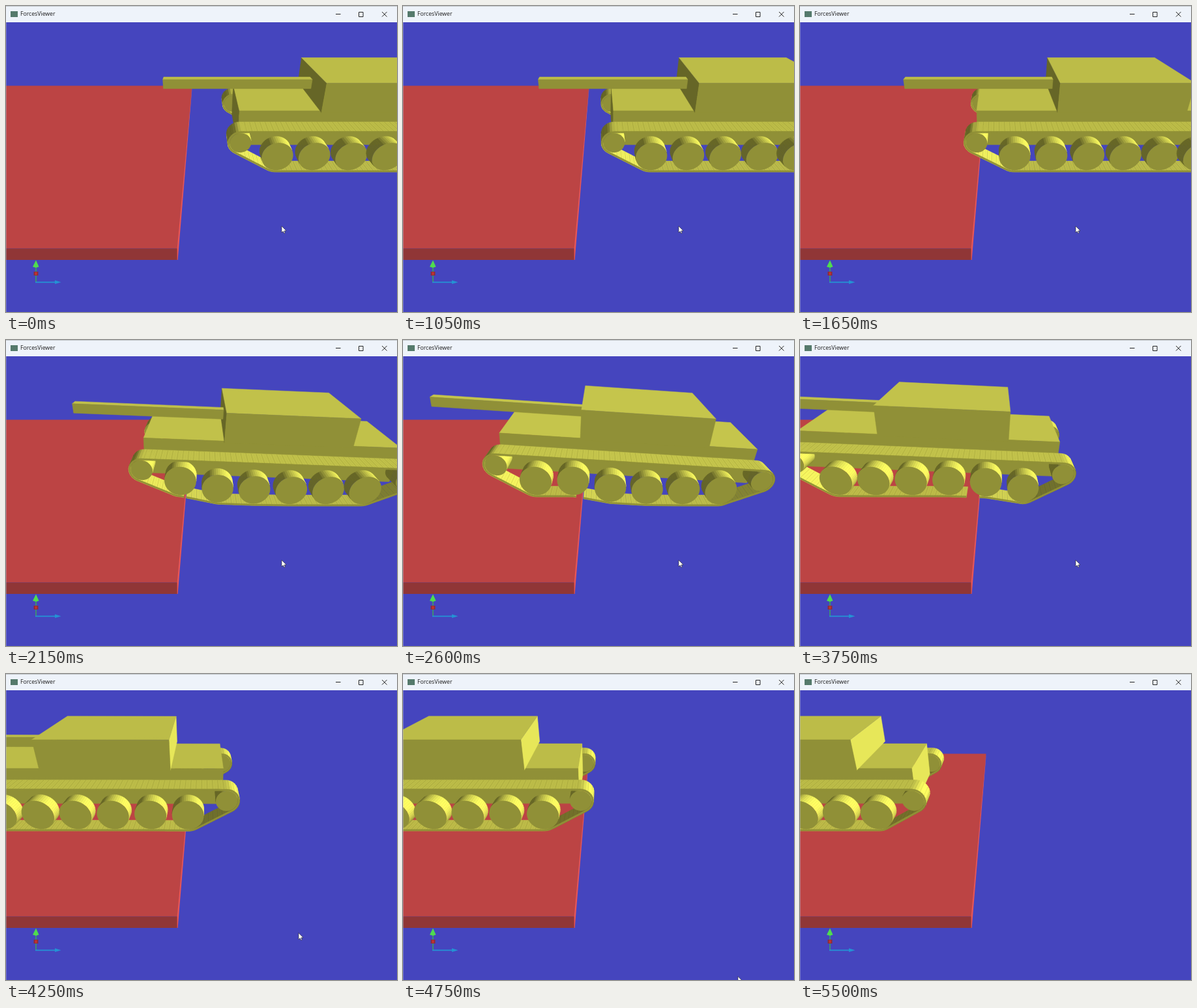
Recreate the animation shown at these times as an HTML page with a canvas. Size 600 by 470 pixels, loop 5550 ms.

```html
<!DOCTYPE html>
<html lang="en">
<head>
<meta charset="utf-8">
<title>ForcesViewer</title>
<style>
html, body { margin: 0; width: 100%; height: 100%; overflow: hidden; background: #4545be; }
#stage { position: absolute; left: 0; top: 0; width: 600px; height: 470px; overflow: hidden; }
canvas { position: absolute; left: 0; top: 0; }
#bar { position: absolute; left: 0; top: 0; width: 600px; height: 25px; background: #eef3fa; border-top: 1px solid #c3c7cc; box-sizing: border-box; }
#bar span { position: absolute; left: 22px; top: 5px; font: 8.7px/13px "Open Sans", "Noto Sans", sans-serif; color: #1c1c1c; white-space: nowrap; }
#bar i { position: absolute; left: 7px; top: 7px; width: 11px; height: 9px; background: #557a6c; }
#bar svg { position: absolute; left: 500px; top: -1px; }
</style>
</head>
<body>
<div id="stage">
  <canvas id="view" width="600" height="470"></canvas>
  <div id="bar">
    <i></i><span>ForcesViewer</span>
    <svg width="100" height="24" fill="none" stroke="#222">
      <path d="M6 12.500h7.500M41.500 9.500h6.500v7h-6.500zM77 9l7.500 7.500M84.500 9l-7.500 7.500"/>
    </svg>
  </div>
</div>
<script>
const ctx = document.getElementById('view').getContext('2d');
const LOOP = 5550, STEP = 50;

// Camera
const TILT = 30.7 * Math.PI / 180, SIN = Math.sin(TILT), COS = Math.cos(TILT);
const FOCAL = 538, EYE_Y = 269;

// World: y = 0 is the platform top, x = 0 is straight ahead of the camera.
const EDGE = -28, LOW = -16.4;
const START = 252.5, ACCEL = 63.2, RAMP = 2.43, CRUISE = 126;

// Tank
const WIDTH = 198, TRACK_W = 34.5, HALF = 197.5, GAP = 56.1;
const WHEEL_R = 23.8, RIM = 27, IDLER_R = 19, IDLER_Y = 50.5, DROOP = 3;
const LINKS = 116;
const YELLOW = [1, 1, 0.385];

const clamp = (v, a, b) => Math.min(b, Math.max(a, v));

function project([x, y], z) {
  const w = FOCAL / (FOCAL - SIN * y + COS * z);
  return [303 + x * w, 247 - (6 + COS * y + SIN * z) * w];
}
function shade(nx, ny, nz = 0) {
  const k = 102 + 161 * Math.max(0, nx * 0.802 + ny * 0.535 + nz * 0.26);
  return `rgb(${YELLOW.map(c => Math.round(Math.min(255, k) * c))})`;
}
const facing = (nx, ny, [x, y]) => -nx * x + ny * (EYE_Y - y) > 0;

function poly(points, color, seal) {
  ctx.beginPath();
  points.forEach(p => ctx.lineTo(p[0], p[1]));
  ctx.closePath();
  ctx.fillStyle = color;
  ctx.fill();
  if (seal) {
    ctx.strokeStyle = color;
    ctx.lineWidth = 0.5;
    ctx.stroke();
  }
}
const strip = (a, b, z0, z1, color) =>
  poly([project(a, z0), project(b, z0), project(b, z1), project(a, z1)], color, true);

function line(points, color, width) {
  ctx.beginPath();
  points.forEach(p => ctx.lineTo(p[0], p[1]));
  ctx.strokeStyle = color;
  ctx.lineWidth = width;
  ctx.stroke();
}

function arc([x, y], r, from, to, n) {
  return Array.from({ length: n + 1 }, (_, i) => {
    const a = (from + (to - from) * i / n) * Math.PI / 180;
    return [x + r * Math.cos(a), y + r * Math.sin(a)];
  });
}

function cylinder(c, r, z0, z1) {
  const n = 48, ring = arc(c, r, 0, 360, n);
  for (let i = 0; i < n; i++) {
    const a = (i + 0.5) * 2 * Math.PI / n, nx = Math.cos(a), ny = Math.sin(a);
    if (facing(nx, ny, ring[i])) strip(ring[i], ring[i + 1], z0, z1, shade(nx, ny));
  }
  poly(ring.map(p => project(p, z0)), shade(0, 0, 1));
}

// Height of a wheel rolling from the low floor over the platform's corner.
function ground(x) {
  const d = clamp(x - EDGE, 0, RIM);
  return Math.max(LOW, Math.sqrt(RIM * RIM - d * d) - RIM);
}

// Uniform acceleration, then constant speed.
function drive(t) {
  const u = Math.min(t, RAMP);
  return START - ACCEL * u * u / 2 - CRUISE * (t - u);
}

const slots = [-2.5, -1.5, -0.5, 0.5, 1.5, 2.5].map(k => k * GAP);

// Equal springs: the hull settles on the best-fit line through its wheels.
function settle(x) {
  let lift = 0, slope = 0, spread = 0;
  slots.forEach(u => {
    const h = ground(x + u);
    lift += h / slots.length;
    slope -= u * h;
    spread += u * u;
  });
  const pitch = Math.atan(slope / spread), s = Math.sin(pitch), c = Math.cos(pitch);
  const turn = (u, v) => [u * c + v * s, v * c - u * s];
  const at = (u, v) => {
    const [dx, dy] = turn(u, v - 50);
    return [x + dx, 50 + dy + lift];
  };
  return { at, turn };
}

function box({ at, turn }, x0, x1, y0, y1, z0, z1) {
  const bl = at(x0, y0), br = at(x1, y0), tr = at(x1, y1), tl = at(x0, y1);
  [[bl, tl, -1, 0], [br, tr, 1, 0], [tl, tr, 0, 1]].forEach(([a, b, nx, ny]) => {
    const n = turn(nx, ny);
    if (facing(...n, a)) strip(a, b, z0, z1, shade(...n));
  });
  poly([bl, br, tr, tl].map(p => project(p, z0)), shade(0, 0, 1), true);
}

// Pieces of the belt, evenly spaced, two to a link.
function makeBelt([front, rear], wheels, travel) {
  const path = [
    ...arc(front, IDLER_R, 90, 238, 12),
    ...arc(wheels[0], RIM, 238, 270, 4),
    ...wheels.slice(1, 5).map(([x, y]) => [x, y - RIM]),
    ...arc(wheels[5], RIM, 270, 302, 4),
    ...arc(rear, IDLER_R, 302, 450, 12)
  ];
  path.push(path[0]);
  const dist = (a, b) => Math.hypot(b[0] - a[0], b[1] - a[1]);
  const len = path.slice(1).map((p, i) => dist(path[i], p));
  const count = 2 * LINKS, gap = len.reduce((a, b) => a + b) / count, phase = travel % (2 * gap);
  const points = [];
  let seg = 0, done = 0;
  for (let i = 0; i < count; i++) {
    const s = i * gap + phase;
    while (seg < len.length - 1 && done + len[seg] < s) done += len[seg++];
    const a = path[seg], b = path[seg + 1], u = Math.min(1, (s - done) / len[seg]);
    points.push([a[0] + (b[0] - a[0]) * u, a[1] + (b[1] - a[1]) * u]);
  }
  return points.map((a, i) => {
    const b = points[(i + 1) % count], d = dist(a, b) || 1;
    const nx = (b[1] - a[1]) / d, ny = (a[0] - b[0]) / d;
    const buried = (a[0] + b[0]) / 2 < EDGE && (a[1] + b[1]) / 2 < -1;
    return { a, b, nx, ny, tick: i % 2 === 0, outer: facing(nx, ny, a), buried };
  }).filter(p => !p.buried);
}

function track(belt, idlers, wheels, z) {
  const surface = outer => belt.filter(p => p.outer === outer).forEach(({ a, b, nx, ny, tick }) => {
    const k = outer ? 1 : -1;
    strip(a, b, z, z + TRACK_W, shade(nx * k, ny * k));
    if (tick) line([project(a, z), project(a, z + TRACK_W)], 'rgba(70,70,10,.16)', 0.7);
  });
  surface(false);
  idlers.forEach(c => cylinder(c, 16, z, z + TRACK_W));
  wheels.forEach(c => cylinder(c, WHEEL_R, z, z + 22));
  surface(true);
  belt.forEach(({ a, b, nx, ny }) => {
    const inset = p => [p[0] - nx * 2.6, p[1] - ny * 2.6];
    poly([a, b, inset(b), inset(a)].map(p => project(p, z)), shade(0, 0, 1), true);
  });
}

function tank(t) {
  const x = drive(t), body = settle(x);
  const idlers = [-HALF, HALF].map(u => body.at(u, IDLER_Y));
  const wheels = slots.map(u => {
    const [wx, wy] = body.at(u, RIM);
    return [wx, Math.max(RIM + ground(wx), wy - DROOP)];
  });
  const belt = makeBelt(idlers, wheels, START - x);
  const gun = () => box(body, -318, -77, 103.4, 118.5, 92, 106);
  const turret = () => box(body, -77, 115, 89, 133.6, 24, WIDTH - 24);
  const turretFrontSeen = body.at(-77, 110)[0] > 0;

  track(belt, idlers, wheels, WIDTH - TRACK_W);
  box(body, -198, 193, 30, 87.8, TRACK_W, WIDTH - TRACK_W);
  (turretFrontSeen ? [turret, gun] : [gun, turret]).forEach(draw => draw());
  track(belt, idlers, wheels, 0);
}

function platform() {
  poly([[0, 122.5], [285.5, 122.5], [263, 372.5], [0, 372.5]], '#bc4444');
  poly([[0, 372.5], [263, 372.5], [263, 390], [0, 390]], '#903636');
  poly([[285.5, 122.5], [285.2, 130], [263.6, 390], [262.6, 390], [262.6, 372.5]], '#e85656');
}

function axes() {
  line([[46, 424], [46, 400]], '#3f9f62', 1.6);
  line([[45, 424.3], [77, 424.3]], '#2492d4', 1.8);
  poly([[75, 421.2], [84.5, 424.3], [75, 427]], '#2492d4');
  poly([[41, 400.5], [46, 390.5], [50.5, 400.5], [46, 402]], '#4fdc4f');
  poly([[42.5, 408], [49.5, 408], [49.5, 414], [42.5, 414]], '#8e3038');
  poly([[44.8, 409], [47.2, 409], [47.2, 413], [44.8, 413]], '#d22f2f');
}

// The mouse rests, then sweeps off the bottom edge.
function pointer(t) {
  const u = clamp((t - 4.05) / 0.7, 0, 1.2);
  const x = 423 + 91 * Math.min(u, 1), y = 338 + 126.5 * Math.pow(u, 0.6);
  const shape = [[0, 0], [0, 10], [2.3, 8], [3.8, 11.3], [5.3, 10.6], [3.9, 7.4], [7, 7.2]];
  const points = shape.map(p => [p[0] + x, p[1] + y]);
  poly(points, '#fff');
  line([...points, points[0]], '#222', 0.6);
}

function frame() {
  const t = Math.floor(performance.now() % LOOP / STEP) * STEP / 1000;
  ctx.fillStyle = '#4545be';
  ctx.fillRect(0, 0, 600, 470);
  platform();
  tank(t);
  axes();
  pointer(t);
  ctx.fillStyle = 'rgba(190,195,225,.35)';
  ctx.fillRect(0, 25, 1, 445);
  requestAnimationFrame(frame);
}
frame();
</script>
</body>
</html>
```
